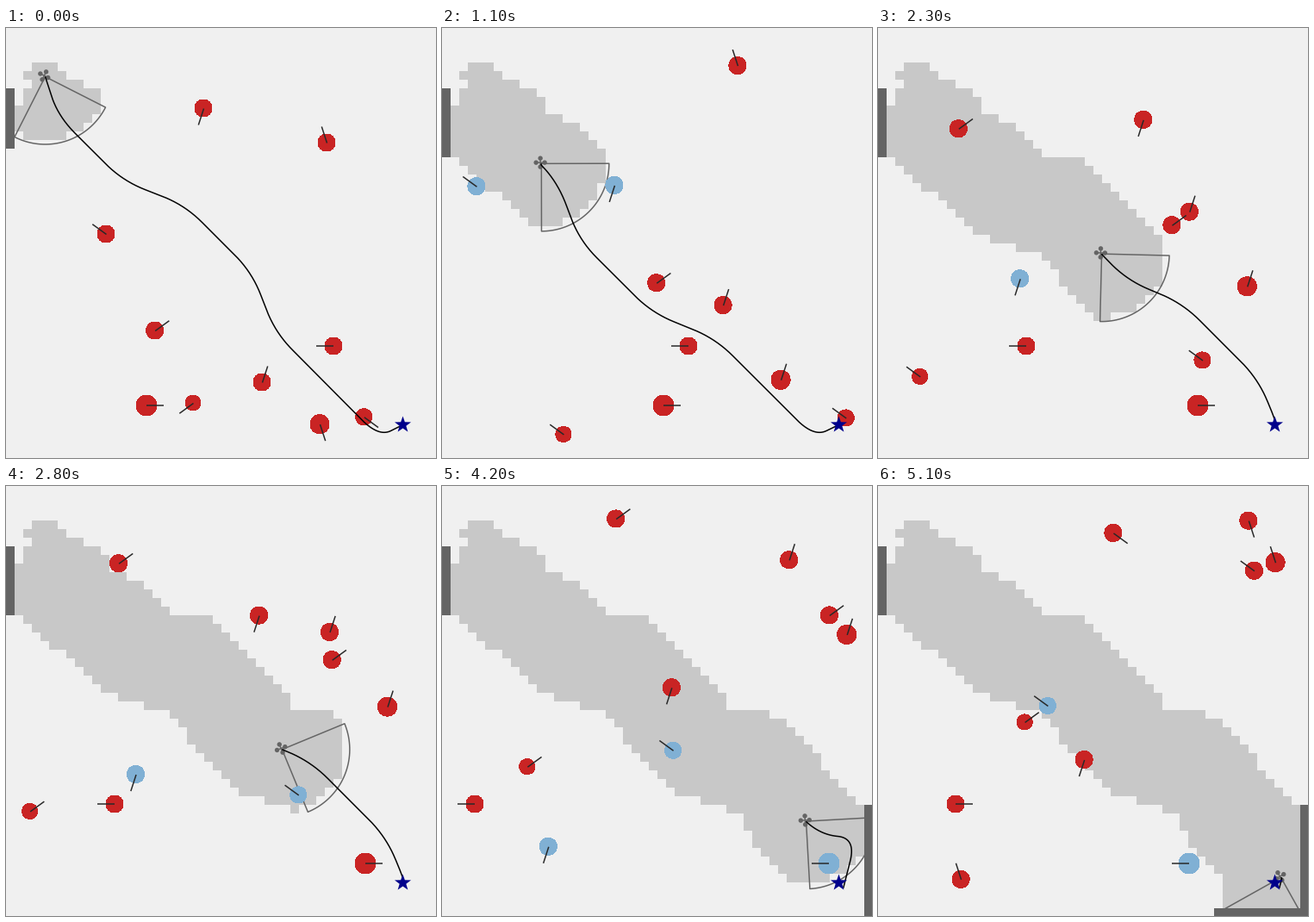
Recreate the animation shown at these times as a matplotlib script. Size 499 by 499 pixels, loop 5.2 s.

```python
import numpy as np
import matplotlib.pyplot as plt
from matplotlib.animation import FuncAnimation
from matplotlib.patches import Circle, Polygon

SIZE, DPI = 499, 100
FRAMES, INTERVAL = 52, 100
LAST = 215                    # last simulation tick
CELL, GRID = 10, 50
VIEW, HALF_FOV = 78.5, 45

FREE, SEEN, WALL = (240, 240, 240), (200, 200, 200), (100, 100, 100)
RED, BLUE = (201 / 255, 36 / 255, 36 / 255), (128 / 255, 176 / 255, 212 / 255)
GREY, DARK, NAVY = "#646464", "#282828", "#00008b"
GOAL = (460, 460)


def px(width):
    return width * 72 / DPI


def rounded(*corners, cut=28):
    """Polyline with rounded corners, sampled every pixel of its length."""
    c = np.array(corners, float)
    u = np.linspace(0, 1, 30)[:, None]
    parts = [c[:1]]
    for a, b, d in zip(c, c[1:], c[2:]):
        start, end = (b + (p - b) * min(0.5, cut / np.hypot(*(p - b))) for p in (a, d))
        parts.append((1 - u)**2 * start + 2 * u * (1 - u) * b + u**2 * end)
    pts = np.vstack(parts + [c[-1:]])
    length = np.r_[0, np.cumsum(np.hypot(*np.diff(pts, axis=0).T))]
    steps = np.arange(length[-1])
    return np.c_[np.interp(steps, length, pts[:, 0]), np.interp(steps, length, pts[:, 1])]


# Playback: (frame, simulation tick), with two pauses for replanning
PACE = [(0, 0), (6, 29), (11, 47), (18, 82), (28, 127), (35, 160), (37, 160),
        (38, 161), (40, 161), (46, 191), (49, 211), (50, 211), (51, 215)]
frame_ticks = np.rint(np.interp(np.arange(FRAMES), *zip(*PACE))).astype(int)

# The drone follows this track; (tick, distance) pairs give its speed
TRACK = rounded((45, 56), (60, 102), (135, 177), (209, 209), (288, 292), (353, 319),
                (437, 404), (480, 408), (467, 454))
TRAVEL = [(0, 0), (47, 125), (82, 233), (127, 381), (160, 484), (191, 569), (LAST, len(TRACK))]

ticks = np.arange(LAST + 1)
dist = np.interp(ticks, *zip(*TRAVEL))
along = np.arange(len(TRACK))
slope = np.gradient(TRACK, axis=0)
bearing = np.unwrap(np.arctan2(slope[:, 1], slope[:, 0]))
drone_x, drone_y, heading = (np.interp(dist, along, v) for v in (*TRACK.T, bearing))

# Planned routes and the tick from which each one is valid
ROUTES = [
    (0, rounded((45, 56), (60, 102), (135, 177), (207, 205), (285, 283), (312, 353),
                (432, 474), GOAL)),
    (34, rounded((100, 143), (134, 179), (159, 246), (243, 330), (317, 360),
                 (431, 474), GOAL)),
    (62, rounded((135, 177), (206, 207), (288, 292), (353, 319), (440, 406),
                 (461, 455), GOAL)),
    (162, rounded((402, 369), (437, 404), (480, 408), (465, 467))),
]

# Obstacles: start x, y, radius and, if it gets noticed, the tick of that.
# Headings go round in steps of 36 degrees.
BALLS = [(163, 438, 12, 163), (415.3, 451.3, 9.5, 118), (364, 459.6, 11), (229, 93, 10, 43),
         (217, 435, 9), (380, 369, 10), (116, 239, 10, 28), (372, 133, 10),
         (297, 411, 10), (172.7, 351, 10)]
SPEED, LEAD = 2, 20


def simulate(angle, x, y, r, noticed=None):
    """State per tick: x, y, unit direction and whether the ball is tracked."""
    pos = np.array([x, y], float)
    aim = np.array([np.cos(angle), np.sin(angle)])
    tracked, states = False, []
    for tick in ticks:
        tracked = tracked or tick == noticed
        states.append((*pos, *aim, tracked))
        ahead = pos + SPEED * aim
        hit = (ahead < CELL + r) | (ahead > SIZE - 9 - r)
        if hit.any():
            aim = np.where(hit, -aim, aim)
            tracked = False
        pos = pos + SPEED * aim
    return states


ball_states = [simulate(np.radians(36 * i), *b) for i, b in enumerate(BALLS)]

# Explored cells: a small disc around the drone plus a slightly widened view cone
centers = (np.arange(GRID) + 0.5) * CELL
cell_x, cell_y = np.meshgrid(centers, centers)
inside = np.zeros((GRID, GRID), bool)
inside[1:-1, 1:-1] = True


def in_view(x, y, angle, reach=74, setback=14, half=np.radians(47)):
    ux, uy = np.cos(angle), np.sin(angle)
    dx, dy = cell_x - x, cell_y - y
    away = np.hypot(dx, dy)
    turn = np.arctan2(dy + setback * uy, dx + setback * ux) - angle
    turn = np.abs((turn + np.pi) % (2 * np.pi) - np.pi)
    return inside & ((away < 21) | (away < reach) & (turn < half))


explored = np.logical_or.accumulate(
    [in_view(*pose) for pose in zip(drone_x, drone_y, heading)])


def grid_image(tick):
    img = np.full((GRID, GRID, 3), FREE, np.uint8)
    img[explored[tick]] = SEEN
    img[7:15 if tick > 10 else 14, 0] = WALL
    if tick > 170:
        img[37:, -1] = WALL
    if tick > 202:
        img[-1, 39:] = WALL
    return img


fig = plt.figure(figsize=(SIZE / DPI, SIZE / DPI), dpi=DPI)
ax = fig.add_axes([0, 0, 1, 1])
ax.axis("off")
floor = ax.imshow(grid_image(0), extent=(-0.5, 499.5, 499.5, -0.5),
                  interpolation="nearest", aspect="auto", zorder=0)
ax.set_xlim(-0.5, SIZE - 0.5)
ax.set_ylim(SIZE - 0.5, -0.5)


def stroke(color, width, z):
    return ax.plot([], [], color=color, lw=px(width), zorder=z,
                   solid_capstyle="butt", solid_joinstyle="round")[0]


cone = stroke(GREY, 1.5, 1)
arms = [stroke(GREY, 1.5, 2) for _ in range(2)]
rotors = [ax.add_patch(Circle((0, 0), 2.7, color=GREY, lw=0, zorder=2)) for _ in range(4)]
discs, leads = [], []
for i, ball in enumerate(BALLS):
    discs.append(ax.add_patch(Circle((0, 0), ball[2], lw=0, antialiased=False,
                                     zorder=3 + i / 20)))
    leads.append(stroke(DARK, 1.5, 3.02 + i / 20))
plan = stroke("black", 1.5, 4)
spikes = np.radians(-90 + 36 * np.arange(10))
reach = np.where(np.arange(10) % 2, 4, 10)
ax.add_patch(Polygon(np.c_[GOAL[0] + reach * np.cos(spikes), GOAL[1] + reach * np.sin(spikes)],
                     color=NAVY, lw=0, zorder=5))


def draw_drone(x, y, angle):
    fov = np.radians(HALF_FOV)
    view = np.linspace(angle - fov, angle + fov, 40)
    cone.set_data(np.r_[x, x + VIEW * np.cos(view), x],
                  np.r_[y, y + VIEW * np.sin(view), y])
    a = angle + np.pi / 4 + np.pi / 2 * np.arange(4)
    rx, ry = x - 1.2 + 5 * np.cos(a), y - 1.2 + 5 * np.sin(a)
    for rotor, center in zip(rotors, zip(rx, ry)):
        rotor.center = center
    for k, arm in enumerate(arms):
        arm.set_data(rx[k::2], ry[k::2])


def draw_plan(tick, x, y):
    path = [p for start, p in ROUTES if start <= tick][-1]
    near = np.argmin(np.hypot(path[:, 0] - x, path[:, 1] - y))
    rest = path[near + 1:]
    plan.set_data(np.r_[x, rest[:, 0]], np.r_[y, rest[:, 1]])


def update(frame):
    tick = frame_ticks[frame]
    x, y = drone_x[tick], drone_y[tick]
    floor.set_data(grid_image(tick))
    draw_drone(x, y, heading[tick])
    draw_plan(tick, x, y)
    for disc, lead, states in zip(discs, leads, ball_states):
        bx, by, ux, uy, tracked = states[tick]
        disc.center = (bx - 0.5, by - 0.5)
        disc.set_facecolor(BLUE if tracked else RED)
        lead.set_data([bx, bx + LEAD * ux], [by, by + LEAD * uy])
    return [floor, cone, plan, *arms, *rotors, *discs, *leads]


anim = FuncAnimation(fig, update, frames=FRAMES, interval=INTERVAL,
                     repeat=True, repeat_delay=0)
plt.show()
```
